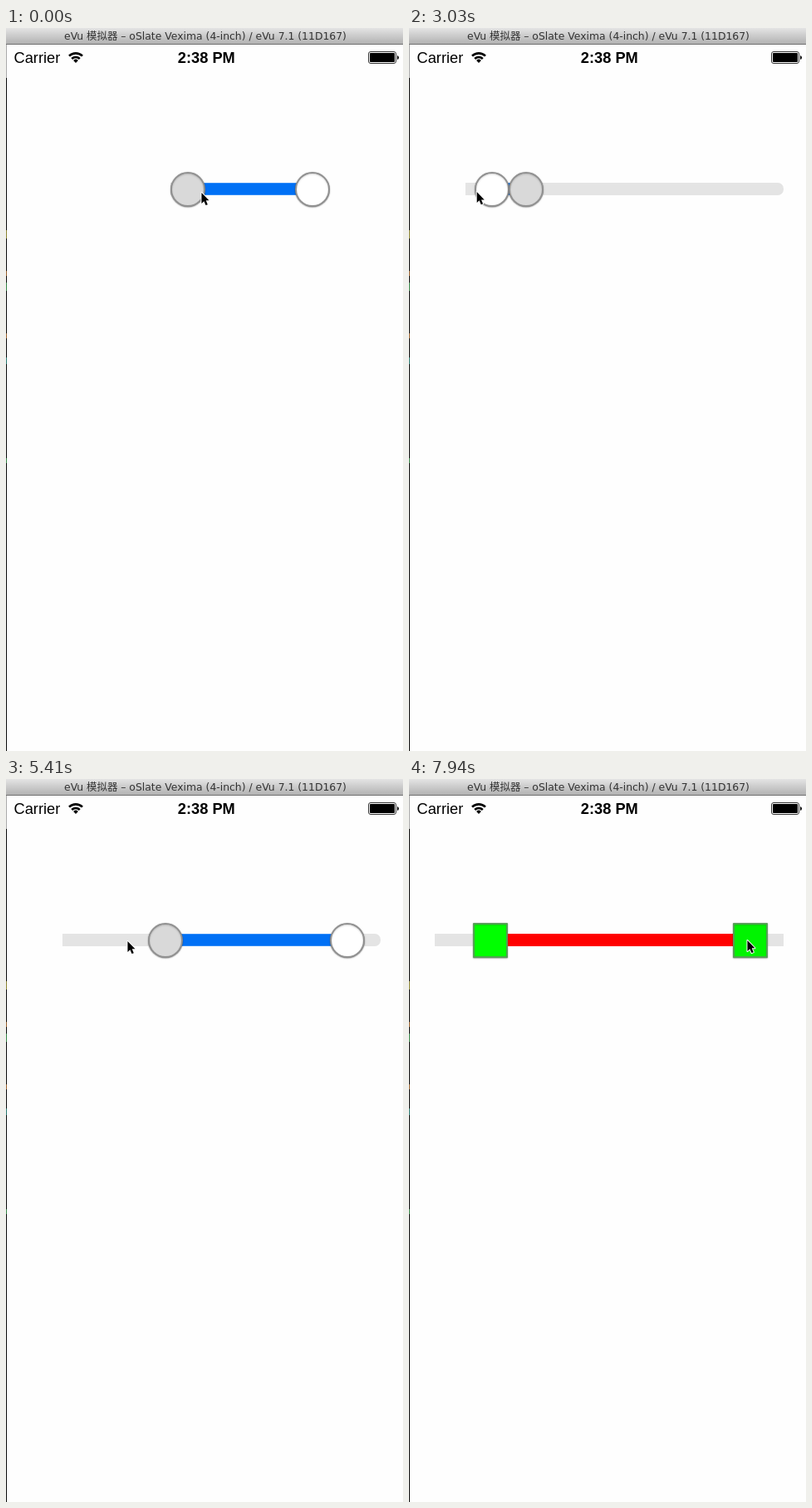
Recreate the animation shown at these times as an HTML page. Size 478 by 869 pixels, loop 8 s.

```html
<!DOCTYPE html>
<html lang="zh">
<head>
<meta charset="utf-8">
<title>Range slider</title>
<style>
@property --left { syntax: "<length>"; inherits: true; initial-value: 219px; }
@property --right { syntax: "<length>"; inherits: true; initial-value: 369px; }
@property --shown-from { syntax: "<length>"; inherits: true; initial-value: 198px; }
@property --shown-to { syntax: "<length>"; inherits: true; initial-value: 369px; }
@property --x { syntax: "<length>"; inherits: true; initial-value: 234px; }
@property --y { syntax: "<length>"; inherits: true; initial-value: 197px; }

html, body { margin: 0; width: 100%; height: 100%; overflow: hidden; background: #fefefe; }
.stage {
  position: relative; width: 478px; height: 869px; overflow: hidden; background: #fefefe;
  animation: left 8s linear infinite, right 8s linear infinite,
    reveal 8s linear infinite, pointer 8s linear infinite;
}
.stage > * { position: absolute; box-sizing: border-box; }
.chrome { left: 0; top: 0; }

.track {
  left: 33px; top: 186px; width: 418px; height: 15px; border-radius: 7px; background: #e4e4e4;
  clip-path: inset(0 calc(451px - var(--shown-to)) 0 calc(var(--shown-from) - 33px));
  animation: track 8s linear infinite;
}
.range {
  left: var(--left); top: 186px; width: calc(var(--right) - var(--left)); height: 15px;
  border-block: 1px solid rgba(255, 255, 255, .2);
  background: #0070f5; animation: range 8s linear infinite;
}
.thumb {
  top: 173px; width: 42px; height: 42px; border: 2px solid #919191; border-radius: 50%;
  box-shadow: 0 .5px 1.5px rgba(0, 0, 0, .5), inset 0 1px 2px rgba(0, 0, 0, .16);
}
.thumb.a { left: calc(var(--left) - 21px); animation: shape 8s linear infinite, shade-a 8s linear infinite; }
.thumb.b { left: calc(var(--right) - 21px); animation: shape 8s linear infinite, shade-b 8s linear infinite; }
.pointer { left: 0; top: 0; overflow: visible; transform: translate(var(--x), var(--y)); }

@keyframes left {
  0%, .75% { --left: 219px; }
  1.5% { --left: 231px; }
  4.375%, 6.625% { --left: 89.5px; }
  13.25%, 14% { --left: 241px; }
  16.125%, 17.625% { --left: 271px; }
  18.625%, 22.375% { --left: 327px; }
  25.5%, 61.125% { --left: 100px; }
  64.75% { --left: 262px; }
  67.625%, 68.375% { --left: 191.5px; }
  70.5%, 71.25% { --left: 77px; }
  72% { --left: 54px; }
  76% { --left: 184px; }
  81.25%, 82% { --left: 90px; }
  84.75%, 85.5% { --left: 143px; }
  86.25% { --left: 148px; }
  89.125%, 100% { --left: 98px; }
}
@keyframes right {
  0%, 30.5% { --right: 369px; }
  35.6%, 38.6% { --right: 141px; }
  41.25% { --right: 410.5px; }
  45%, 45.75% { --right: 232px; }
  46.2%, 51.6% { --right: 141px; }
  55.625%, 100% { --right: 410.5px; }
}
@keyframes reveal {
  0%, 1.5% { --shown-from: 198px; --shown-to: 369px; }
  4.375% { --shown-from: 68px; }
  17.62% { --shown-to: 369px; }
  17.63% { --shown-to: 451px; }
  71.24% { --shown-from: 68px; }
  71.25%, 92.12% { --shown-from: 33px; }
  92.13%, 100% { --shown-from: 31px; --shown-to: 451px; }
}
@keyframes pointer {
  0%, .75% { --x: 234px; --y: 197px; }
  1.5% { --x: 246px; --y: 199px; }
  4.375%, 6.625% { --x: 105px; --y: 200px; }
  13.25%, 14% { --x: 257px; --y: 201px; }
  16.125%, 17.625% { --x: 287px; --y: 204px; }
  20.75% { --x: 462px; --y: 204px; }
  25.5%, 27.75% { --x: 115px; --y: 198px; }
  29.25%, 30.5% { --x: 383px; --y: 192px; }
  37.25%, 37.875% { --x: 79px; --y: 196px; }
  41.25% { --x: 421px; --y: 200px; }
  45%, 45.75% { --x: 245px; --y: 192px; }
  46.375%, 50.875% { --x: 105px; --y: 196px; }
  55.625%, 56.5% { --x: 418px; --y: 202px; }
  60.375%, 61.125% { --x: 108px; --y: 200px; }
  64.75% { --x: 272px; --y: 200px; }
  67.625%, 68.375% { --x: 145px; --y: 194px; }
  70.5%, 71.25% { --x: 57px; --y: 197px; }
  76% { --x: 190px; --y: 201px; }
  81.25%, 82% { --x: 91px; --y: 198px; }
  84.75%, 85.5% { --x: 143px; --y: 189px; }
  86.25% { --x: 157px; --y: 192px; }
  89.125%, 92.125% { --x: 99px; --y: 196px; }
  96.25% { --x: 437px; --y: 208px; }
  99.25%, 100% { --x: 406px; --y: 193px; }
}
@keyframes track {
  0%, 92.12% { left: 33px; width: 418px; border-radius: 7px; }
  92.13%, 100% { left: 31px; width: 420px; border-radius: 0; }
}
@keyframes range {
  0%, 92.12% { background-color: #0070f5; border-color: rgba(255, 255, 255, .2); }
  92.13%, 100% { background-color: #f00; border-color: transparent; }
}
@keyframes shape {
  0%, 92.12% { border-radius: 50%; border-color: #919191; }
  92.13%, 100% { border-radius: 1px; border-color: #55a055; }
}
@keyframes shade-a {
  0%, 27.75% { background: #d9d9d9; }
  29.25% { background: #f3f3f3; }
  30.5%, 61.125% { background: #fff; }
  62.5%, 87.5% { background: #d9d9d9; }
  89.125%, 92.12% { background: #fff; }
  92.13%, 100% { background: #0f0; }
}
@keyframes shade-b {
  0%, 29.9% { background: #fff; }
  31.25%, 56.5% { background: #d9d9d9; }
  58.5%, 92.12% { background: #fff; }
  92.13%, 98.5% { background: #0f0; }
  99.25%, 100% { background: #00f400; }
}
</style>
</head>
<body>
<div class="stage">
  <svg class="chrome" width="478" height="869">
    <defs>
      <linearGradient id="bar" x2="0" y2="1">
        <stop stop-color="#e4e4e4"/><stop offset="1" stop-color="#b2b2b2"/>
      </linearGradient>
    </defs>
    <path d="M.5 20V60" stroke="#aaa"/>
    <path d="M.5 60V869" stroke="#0b0b0b"/>
    <g stroke-width="1">
      <path d="M.5 243v10" stroke="#8b8330"/>
      <path d="M.5 292v6M.5 367v6" stroke="#98602c"/>
      <path d="M.5 306v10M.5 517v6" stroke="#348443"/>
      <path d="M.5 396v8" stroke="#28786f"/>
    </g>
    <rect width="478" height="19" fill="url(#bar)"/>
    <path d="M0 19.5H478" stroke="#707070"/>
    <text x="240" y="14" text-anchor="middle" font-size="12.4" fill="#333"
      font-family="'DejaVu Sans', 'Noto Sans CJK SC', 'Noto Sans CJK', sans-serif">eVu 模拟器 – oSlate Vexima (4-inch) / eVu 7.1 (11D167)</text>
    <g font-family="'Liberation Sans', Arial, sans-serif" font-size="18.3">
      <text x="9.5" y="42">Carrier</text>
      <text x="241.3" y="42" text-anchor="middle" font-weight="bold">2:38 PM</text>
    </g>
    <g fill="none" stroke="#000" stroke-width="2.6">
      <path d="M76 33.6a11.5 11.5 0 0 1 16 0"/>
      <path d="M79.2 37a6.8 6.8 0 0 1 9.6 0"/>
    </g>
    <path d="M84 42l-2.9-3a4.1 4.1 0 0 1 5.8 0z"/>
    <rect x="436.5" y="28.5" width="33" height="14" rx="2.5" fill="none" stroke="#333"/>
    <rect x="438" y="30" width="30" height="11" rx="1"/>
    <path d="M471 33q2 .5 2 2.500t-2 2.500z"/>
  </svg>
  <div class="track"></div>
  <div class="range"></div>
  <div class="thumb a"></div>
  <div class="thumb b"></div>
  <svg class="pointer" width="12" height="18">
    <path transform="translate(1 1) scale(.9)" d="M.5 0V14.500L3.800 11.400 6.100 16.800 8.700 15.700 6.400 10.400H10.500Z"
      stroke="#fff" stroke-width="2.2" paint-order="stroke" stroke-linejoin="round"/>
  </svg>
</div>
</body>
</html>
```
